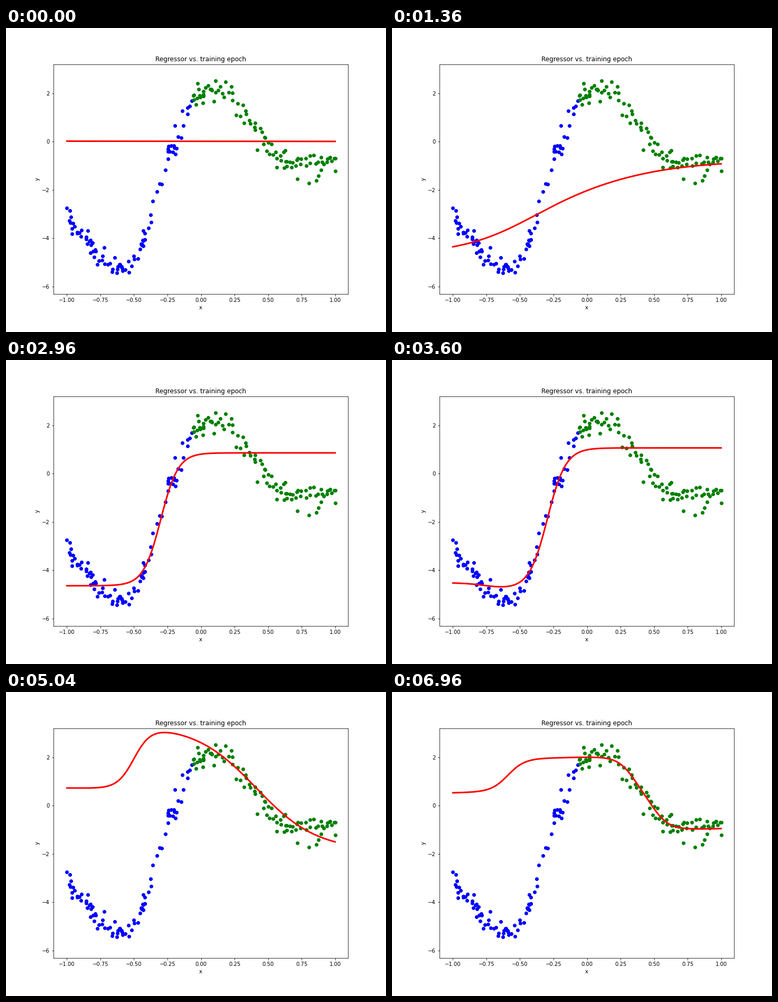
Animation, 720 px wide and 576 px high, one loop 7000 ms. Source, as a matplotlib script:

```python
import numpy as np
import matplotlib.pyplot as plt
from matplotlib.animation import FuncAnimation

FRAMES, STEP = 175, 40

plt.rcParams.update({"font.family": "DejaVu Sans", "font.size": 10})
rng = np.random.default_rng(12)


def cloud(n, spread, knots):
    """Noisy samples along a trend, with equally many between two knots."""
    kx, ky = np.transpose(knots)
    rank = np.linspace(0, len(knots) - 1, n)
    ticks = np.arange(len(knots))
    x = np.interp(rank, ticks, kx) + rng.normal(0, .01, n)
    y = np.interp(rank, ticks, ky) + rng.normal(0, spread, n)
    return np.clip(x, -1, 1), y


first = cloud(94, .2, [
    (-1, -2.9), (-.93, -3.65), (-.84, -4.2), (-.77, -4.75), (-.65, -5.1),
    (-.58, -5.3), (-.46, -4.45), (-.41, -3.8), (-.25, -.65), (-.195, 0),
    (-.07, 1.7)])
second = cloud(95, .25, [
    (-.07, 1.87), (.01, 1.9), (.1, 2.15), (.23, 1.85), (.37, .78),
    (.48, -.15), (.6, -.65), (.67, -.9), (.8, -1), (.91, -.9), (1, -.88)])

x = np.linspace(-1, 1, 200)


def bend(height, steep, centre):
    return height * np.tanh(steep * (x - centre))


# Stages of the fit: time in ms and the curve reached then.
STAGES = [
    (0, .015 - .005 * x),
    (1360, -2.72 + bend(1.05, 2, -.45) + bend(.9, 1.3, .05)),
    (2000, -2.38 + bend(2.1, 5.8, -.34) + bend(.45, 2, -.34)),
    (2960, -1.89 + bend(2.75, 7.7, -.3)),
    (4240, -1.56 + bend(3.09, 7, -.29) - bend(.26, 6, -.75)),
    (5040, -.56 + bend(1.3, 8, -.5) - bend(2.6, 2.2, .41)),
    (5680, -.145 - .05 * x + bend(.7, 8.5, -.635) - bend(1.62, 5, .405)),
    (6960, -.21 + .12 * x + bend(.68, 8, -.59)
     - bend(.77, 8, .34) - bend(.77, 8, .5)),
]


def fit(t):
    """Blend neighbouring stages; the first one starts slowly."""
    for i, ((t0, y0), (t1, y1)) in enumerate(zip(STAGES, STAGES[1:])):
        if t <= t1:
            u = (t - t0) / (t1 - t0)
            if i == 0:
                u **= 2.4
            return y0 + (y1 - y0) * u
    return STAGES[-1][1]


fig = plt.figure(figsize=(10, 8), dpi=72, facecolor="white")
ax = fig.add_axes([.125, .125, .775, .755])
ax.set(xlim=(-1.1, 1.096), ylim=(-6.306, 3.194), xlabel="x", ylabel="y",
       xticks=np.linspace(-1, 1, 9), yticks=range(-6, 3, 2))
ax.set_title("Regressor vs. training epoch", fontsize=12)
ax.scatter(*first, color="b")
ax.scatter(*second, color="g")
curve, = ax.plot(x, fit(0), color="r", lw=3)


def update(i):
    curve.set_ydata(fit(i * STEP))
    return curve,


anim = FuncAnimation(fig, update, frames=FRAMES, interval=STEP,
                     repeat=True, repeat_delay=0)
plt.show()
```
